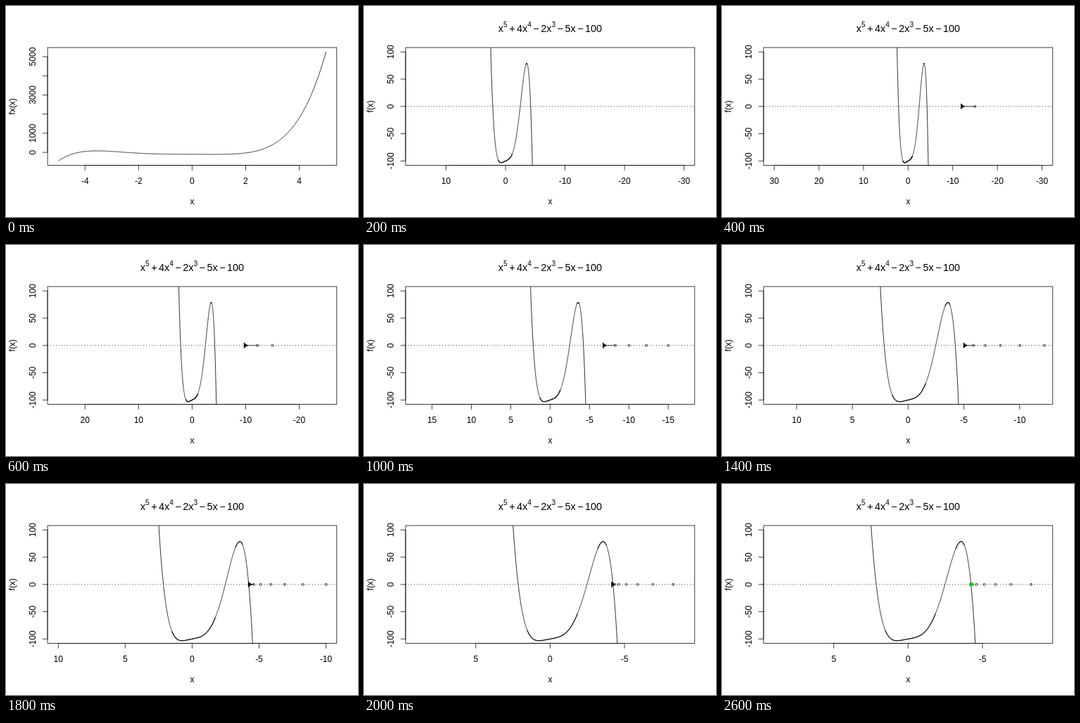
Recreate the animation shown at these times as an HTML page. Size 500 by 300 pixels, loop 2.8 s.

```html
<!DOCTYPE html>
<html lang="en">
<head>
<meta charset="utf-8">
<title>Newton's method</title>
<style>
  html, body { margin: 0; width: 100%; height: 100%; overflow: hidden; background: #fff; }
  svg { display: block; }
  text { font-family: "Liberation Sans", Arial, sans-serif; font-size: 12px; fill: #000; }
  .title { font-size: 14.4px; }
  .sup { font-size: 10.1px; }
  .mid { text-anchor: middle; }
  .rule, .dot { stroke: #000; stroke-width: .75; fill: none; }
  .curve { stroke: #000; stroke-width: .85; fill: none; stroke-linejoin: round; }
</style>
</head>
<body>
<svg id="stage" width="500" height="300" viewBox="0 0 500 300"></svg>
<script>
const LEFT = 59.04, RIGHT = 469.76, TOP = 59.04, BOTTOM = 226.56, TICK = 7.2;
const STEP = 200, STEPS = 14;
const stage = document.getElementById('stage');

const f = x => x ** 5 + 4 * x ** 4 - 2 * x ** 3 - 5 * x - 100;
const slope = x => 5 * x ** 4 + 16 * x ** 3 - 6 * x ** 2 - 5;

// Newton iterates, starting at -15
const roots = [-15];
while (roots.length < 13) {
  const x = roots[roots.length - 1];
  roots.push(x - f(x) / slope(x));
}

// Linear scale with 4% padding at both ends
function scale(a, b, p, q) {
  const pad = (b - a) * 0.04, k = (q - p) / (b - a + 2 * pad);
  const to = v => p + (v - a + pad) * k;
  to.k = Math.abs(k);
  to.min = Math.min(a, b) - Math.abs(pad);
  to.max = Math.max(a, b) + Math.abs(pad);
  return to;
}

function ticks(s, step) {
  const list = [];
  for (let i = Math.ceil(s.min / step); i * step <= s.max; i++) list.push(i * step);
  return list;
}

const rule = (x1, y1, x2, y2, extra = '') =>
  `<line class="rule" x1="${x1}" y1="${y1}" x2="${x2}" y2="${y2}" ${extra}/>`;
const label = (x, y, s) => `<text class="mid" x="${x}" y="${y}">${s}</text>`;
const upright = (x, y, s) =>
  `<text class="mid" transform="translate(${x} ${y}) rotate(-90)">${s}</text>`;
const plotBox = extra =>
  `<rect x="${LEFT}" y="${TOP}" width="${RIGHT - LEFT}" height="${BOTTOM - TOP}" ${extra}/>`;

function axes(sx, xs, sy, ys, yName, shown = () => true) {
  const ends = (s, list) => [s(list[0]), s(list[list.length - 1])];
  const [xa, xb] = ends(sx, xs), [ya, yb] = ends(sy, ys);
  let out = plotBox('class="rule"') +
    rule(xa, BOTTOM, xb, BOTTOM) + rule(LEFT, ya, LEFT, yb);
  for (const v of xs) {
    const x = sx(v);
    out += rule(x, BOTTOM, x, BOTTOM + TICK) + label(x, 252.5, v);
  }
  for (const v of ys) {
    const y = sy(v);
    out += rule(LEFT - TICK, y, LEFT, y);
    if (shown(v)) out += upright(42.2, y, v);
  }
  return out + label(264.4, 282, 'x') + upright(13.4, 142.8, yName);
}

function trace(sx, sy, from, to, keep = () => true, width = 0.85) {
  const n = 1400;
  let d = '', pen = 'M';
  for (let i = 0; i <= n; i++) {
    const x = from + (to - from) * i / n, y = sy(f(x));
    if (y < -300 || y > 600 || !keep(x)) { pen = 'M'; continue; }
    d += pen + sx(x).toFixed(2) + ' ' + y.toFixed(2);
    pen = 'L';
  }
  return `<path class="curve" style="stroke-width:${width}" d="${d}"/>`;
}

function title() {
  const rise = 7;
  const part = (s, dy = 0) => `<tspan dx="2.5" dy="${dy}">${s}</tspan>`;
  const power = (s, n, op) => s + `<tspan class="sup" dy="${-rise}">${n}</tspan>` + part(op, rise);
  return '<text class="title" x="190.8" y="37">' + power('x', 5, '+') +
    power(part('4x'), 4, '−') + power(part('2x'), 3, '−') +
    part('5x') + part('−') + part('100') + '</text>';
}

const clipped = s => `<g clip-path="url(#plot)">${s}</g>`;

function overview() {
  const sx = scale(-5, 5, LEFT, RIGHT), sy = scale(f(-5), f(5), BOTTOM, TOP);
  return axes(sx, ticks(sx, 2), sy, ticks(sy, 1000), 'fx(x)', v => v !== 2000 && v !== 4000) +
    clipped(trace(sx, sy, -5, 5));
}

function arrow(x1, x2, y) {
  return rule(x1, y, x2, y) +
    `<path transform="translate(${x2} ${y})" d="M-2.4-4Q-.2-1.2 2.8 0Q-.2 1.2-2.4 4Z" stroke="#000" stroke-width=".6"/>`;
}

// step 1 shows the bare plot, steps 2..12 one iteration each, step 13 the root
function search(step) {
  const k = Math.min(Math.max(step - 2, 0), 11);
  const lim = Math.ceil(2 * Math.abs(roots[k]));
  const sx = scale(step === 1 ? 15 : lim, -lim, LEFT, RIGHT);
  const sy = scale(-100, 100, BOTTOM, TOP);
  const zero = sy(0);
  let marks = '';
  if (step > 1) {
    for (let i = 0; i <= k; i++)
      marks += `<circle class="dot" cx="${sx(roots[i])}" cy="${zero}" r="1.5"/>`;
    marks += step < 13
      ? arrow(sx(roots[k]), sx(roots[k + 1]), zero)
      : `<circle cx="${sx(roots[k])}" cy="${zero}" r="2.7" fill="#00cd00"/>`;
  }
  // the line is heavier where it runs flat, most of all when zoomed out
  const flat = x => Math.abs(slope(x)) * sy.k / sx.k < 2.5;
  return axes(sx, ticks(sx, sx.max - sx.min > 40 ? 10 : 5), sy, ticks(sy, 50), 'f(x)') + title() +
    clipped(trace(sx, sy, -5.5, 3.5) + trace(sx, sy, -5.5, 3.5, flat, 0.85 + 4 / sx.k) +
      rule(LEFT, zero, RIGHT, zero, 'stroke-dasharray="1 3"') + marks);
}

const defs = `<defs><clipPath id="plot">${plotBox('')}</clipPath></defs>`;
let current = -1;

function draw(ms) {
  const step = Math.floor(ms / STEP) % STEPS;
  if (step === current) return;
  current = step;
  stage.innerHTML = defs + (step ? search(step) : overview());
}

const start = performance.now();
function tick() {
  draw(Math.max(0, performance.now() - start));
  requestAnimationFrame(tick);
}
tick();
</script>
</body>
</html>
```
